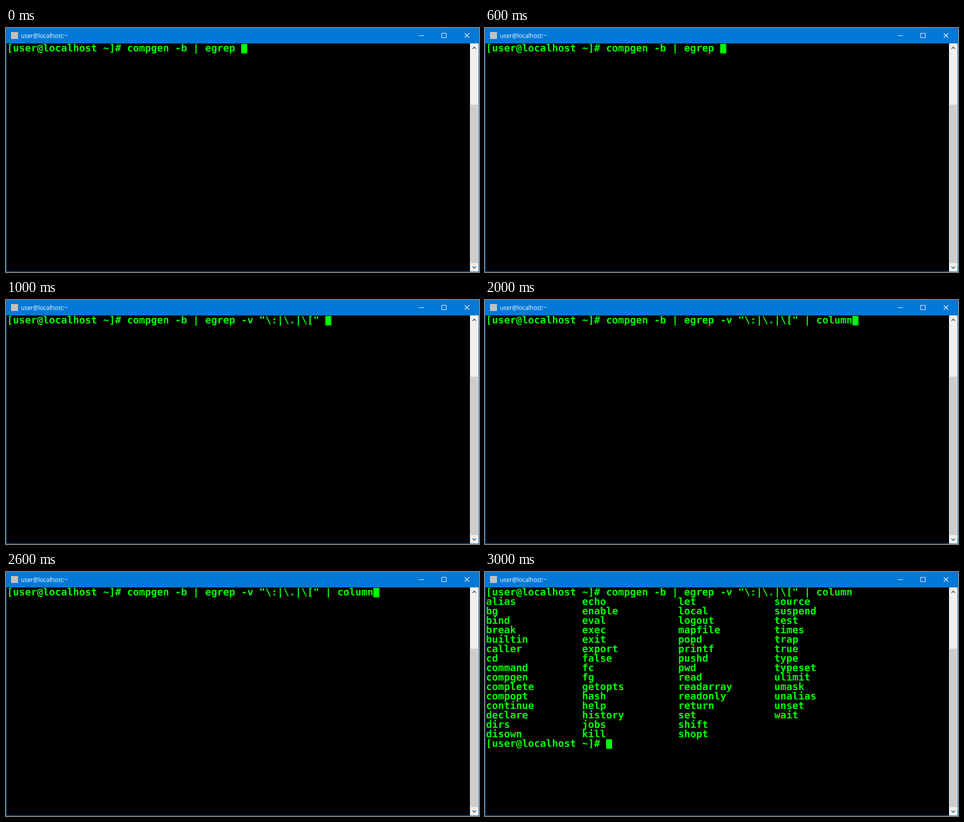
An HTML page that plays this animation: 945x490 px, repeating every 4 s.

```html
<!DOCTYPE html>
<html lang="en">
<head>
<meta charset="utf-8">
<title>Terminal</title>
<style>
  html, body { margin: 0; width: 100%; height: 100%; overflow: hidden; background: #000; }
  svg { display: block; }
  .title { font: 11.7px "Open Sans", "Noto Sans", sans-serif; fill: #fff; }
  .term text {
    font: bold 19.932px "DejaVu Sans Mono", monospace;
    fill: #0f0;
    white-space: pre;
    text-rendering: geometricPrecision;
  }
  .cursor { fill: #0f0; animation: cursor 4s step-end infinite; }
  .filter { animation: filter 4s step-end infinite; }
  .column { animation: column 4s step-end infinite; }
  .output { animation: output 4s step-end infinite; }
  @keyframes cursor {
    0% { transform: translate(470px, 32px); }
    25% { transform: translate(638px, 32px); }
    50% { transform: translate(734px, 32px); }
    75%, 100% { transform: translate(242px, 336px); }
  }
  @keyframes filter { 0% { visibility: hidden; } 25%, 100% { visibility: visible; } }
  @keyframes column { 0% { visibility: hidden; } 50%, 100% { visibility: visible; } }
  @keyframes output { 0% { visibility: hidden; } 75%, 100% { visibility: visible; } }
</style>
</head>
<body>
<svg width="945" height="490" viewBox="0 0 945 490">
  <rect width="945" height="490" fill="#0078d7"/>
  <rect x="1" y="31" width="926" height="458"/>

  <rect x="10" y="8" width="14" height="14" fill="#c0c0c0"/>
  <text class="title" x="30" y="20">user@localhost:~</text>
  <g fill="none" stroke="#fff">
    <path d="M825 15.5h10"/>
    <rect x="870.5" y="10.5" width="9" height="9"/>
    <path d="M916.5 10.5l9 9m0-9l-9 9" stroke-width="1.1"/>
  </g>

  <rect x="927" y="31" width="17" height="458" fill="#f0f0f0"/>
  <rect x="928" y="154" width="15" height="318" fill="#cdcdcd"/>
  <g fill="none" stroke="#505050" stroke-width="1.6">
    <path d="M932 42l3.5-3.5 3.5 3.5"/>
    <path d="M932 479l3.5 3.5 3.5-3.5"/>
  </g>

  <g class="term">
    <text x="2" y="47">[user@localhost ~]# compgen -b | egrep</text>
    <text class="filter" x="470" y="47">-v "\:|\.|\["</text>
    <text class="column" x="638" y="47">| column</text>
    <g class="output" id="output"></g>
    <rect class="cursor" width="12" height="19"/>
  </g>
</svg>
<script>
  const columns = [
    'alias bg bind break builtin caller cd command compgen complete compopt continue declare dirs disown',
    'echo enable eval exec exit export false fc fg getopts hash help history jobs kill',
    'let local logout mapfile popd printf pushd pwd read readarray readonly return set shift shopt',
    'source suspend test times trap true type typeset ulimit umask unalias unset wait'
  ];
  const output = document.getElementById('output');

  function put(str, col, row) {
    const el = document.createElementNS('http://www.w3.org/2000/svg', 'text');
    el.setAttribute('x', 2 + col * 12);
    el.setAttribute('y', 47 + row * 19);
    el.textContent = str;
    output.append(el);
  }

  columns.forEach((list, c) => list.split(' ').forEach((word, r) => put(word, c * 16, r + 1)));
  put('[user@localhost ~]#', 0, 16);
</script>
</body>
</html>
```
